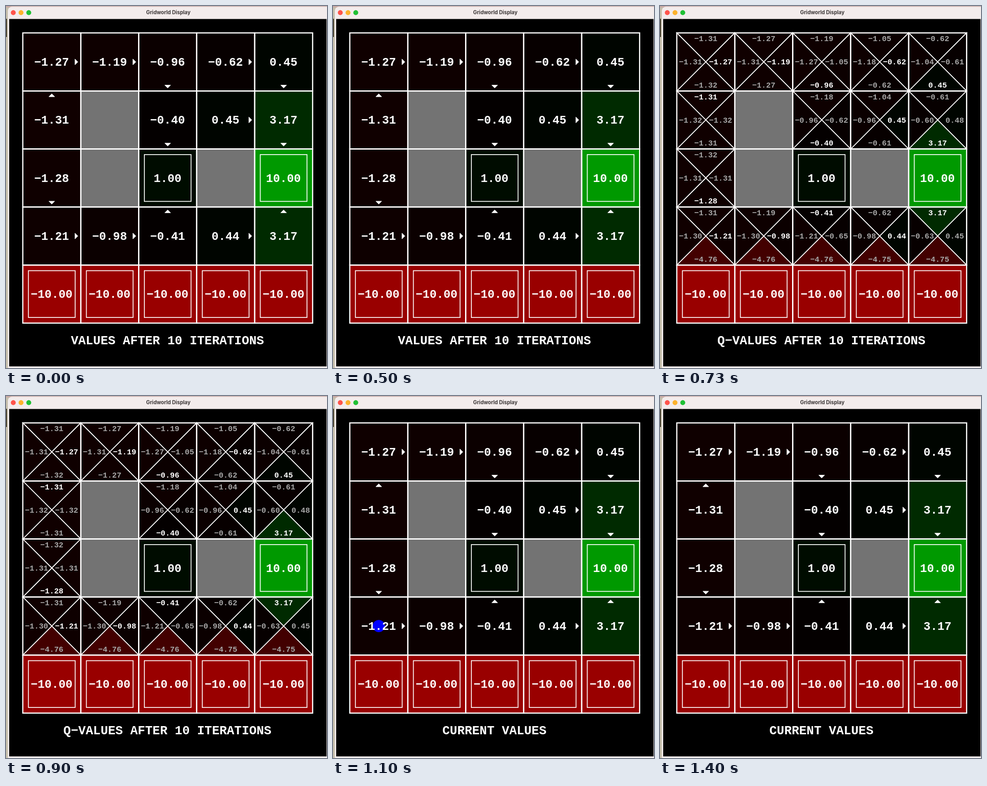
An HTML page with a canvas that plays this animation: 705 px wide and 794 px high, repeating every 1430 ms.

```html
<!DOCTYPE html>
<html lang="en">
<head>
<meta charset="utf-8">
<title>Gridworld Display</title>
<style>
html, body { margin: 0; overflow: hidden; background: #000; }
canvas { display: block; }
</style>
</head>
<body>
<canvas width="705" height="794"></canvas>
<script>
const ctx = document.querySelector('canvas').getContext('2d');
const LOOP = 1430, CELL = 127.3, HALF = CELL / 2, LEFT = 36.9, TOP = 59;
const MONO = '"Liberation Mono", "Courier New", monospace';

// Each cell: q-values north, east, south, west; a single value is an exit, # a wall.
const grid = `
-1.31 -1.27 -1.32 -1.31 | -1.27 -1.19 -1.27 -1.31 | -1.19 -1.05 -0.96 -1.27 | -1.05 -0.62 -0.62 -1.18 | -0.62 -0.61 0.45 -1.04
-1.31 -1.32 -1.31 -1.32 | # | -1.18 -0.62 -0.40 -0.96 | -1.04 0.45 -0.61 -0.96 | -0.61 0.48 3.17 -0.60
-1.32 -1.31 -1.28 -1.31 | # | 1.00 | # | 10.00
-1.31 -1.21 -4.76 -1.30 | -1.19 -0.98 -4.76 -1.30 | -0.41 -0.65 -4.76 -1.21 | -0.62 0.44 -4.75 -0.98 | 3.17 0.45 -4.75 -0.63
-10.00 | -10.00 | -10.00 | -10.00 | -10.00`
  .trim().split('\n').map(row => row.split('|').map(cell => cell.trim().split(' ')));

// Agent position from each time on: [ms, column, row]
const walk = [[1100, 0, 3], [1170, 1, 3], [1230, 2, 3], [1300, 2, 2], [1370, -1, -1]];

function rect(x, y, w, h, fill) {
  ctx.fillStyle = fill;
  ctx.fillRect(x, y, w, h);
}

function disc(x, y, r, fill) {
  ctx.fillStyle = fill;
  ctx.beginPath();
  ctx.arc(x, y, r, 0, 2 * Math.PI);
  ctx.fill();
}

function box(x, y, half, width) {
  ctx.lineWidth = width;
  ctx.strokeRect(x - half, y - half, 2 * half, 2 * half);
}

function label(str, x, y, size, fill = '#fff', align = 'center') {
  ctx.font = `bold ${size}px ${MONO}`;
  ctx.fillStyle = fill;
  ctx.textAlign = align;
  ctx.fillText(str.replace('-', '\u2212'), x, y + size * 0.33);
}

function shade(value) {
  const level = Math.round(153 * (Math.abs(value) / 10) ** 1.12);
  return value < 0 ? `rgb(${level},0,0)` : `rgb(0,${level},0)`;
}

// Triangle whose points are given for north and turned clockwise by quarter turns.
function triangle(x, y, turns, points, fill, width) {
  ctx.save();
  ctx.translate(x, y);
  ctx.rotate(turns * Math.PI / 2);
  ctx.beginPath();
  points.forEach(([px, py]) => ctx.lineTo(px * CELL, py * CELL));
  ctx.closePath();
  ctx.fillStyle = fill;
  ctx.fill();
  ctx.lineWidth = width;
  ctx.stroke();
  ctx.restore();
}

const bestAction = q => q.indexOf(q.reduce((a, b) => +b > +a ? b : a));

function drawValue(q, x, y, hasAgent) {
  const best = bestAction(q), isExit = q.length === 1;
  rect(x - HALF, y - HALF, CELL, CELL, shade(q[best]));
  if (isExit) box(x, y, CELL * 0.403, 1.8);
  else triangle(x, y, best, [[0, -0.45], [-0.05, -0.4], [0.05, -0.4]], '#fff', 1);
  if (hasAgent) disc(x, y, CELL * 0.105, '#00f');
  label(q[best], x - 0.4, y, 25.5);
}

function drawQValues(q, x, y) {
  const best = bestAction(q);
  q.forEach((value, i) =>
    triangle(x, y, i, [[0, 0], [-0.5, -0.5], [0.5, -0.5]], shade(value), 1.8));
  const spots = [[0, -51], [58, 0, 'right'], [0, 50.5], [-59, 0, 'left']];
  spots.forEach(([dx, dy, align], i) =>
    label(q[i], x + dx, y + dy, 17, i === best ? '#fff' : '#a6a6a6', align));
}

function drawWindow() {
  rect(0, 0, 705, 794, '#c6bfac');
  rect(0, 0, 705, 3, '#c9aaa5');
  rect(0, 28, 2, 40, '#37301f');
  ctx.fillStyle = '#f3ecec';
  ctx.beginPath();
  ctx.roundRect(4, 1.5, 720, 810, 9);
  ctx.fill();
  rect(7, 28.5, 697, 762, '#000');
  ['#ff544b', '#fdb22c', '#20c035'].forEach((color, i) => disc(16 + 17 * i, 14.5, 5.4, color));
  ctx.font = 'bold 11.2px Inter, sans-serif';
  ctx.textAlign = 'center';
  ctx.fillStyle = '#3d3838';
  ctx.fillText('Gridworld Display', 356.5, 18);
}

function draw(t) {
  const showQ = t >= 530 && t < 1100;
  const agent = walk.filter(([start]) => t >= start).pop() || [];
  const caption = t < 530 ? 'VALUES AFTER 10 ITERATIONS'
    : showQ ? 'Q-VALUES AFTER 10 ITERATIONS' : 'CURRENT VALUES';

  drawWindow();
  ctx.strokeStyle = '#fff';
  grid.forEach((row, r) => row.forEach((q, c) => {
    const x = LEFT + (c + 0.5) * CELL, y = TOP + (r + 0.5) * CELL;
    if (q[0] === '#') rect(x - HALF, y - HALF, CELL, CELL, '#737373');
    else if (showQ && q.length > 1) drawQValues(q, x, y);
    else drawValue(q, x, y, agent[1] === c && agent[2] === r);
  }));
  grid.forEach((row, r) => row.forEach((q, c) =>
    box(LEFT + (c + 0.5) * CELL, TOP + (r + 0.5) * CELL, HALF, 2.6)));
  label(caption, 354.5, 733.5, 27.2);
}

function tick() {
  draw(performance.now() % LOOP);
  requestAnimationFrame(tick);
}
tick();
</script>
</body>
</html>
```
